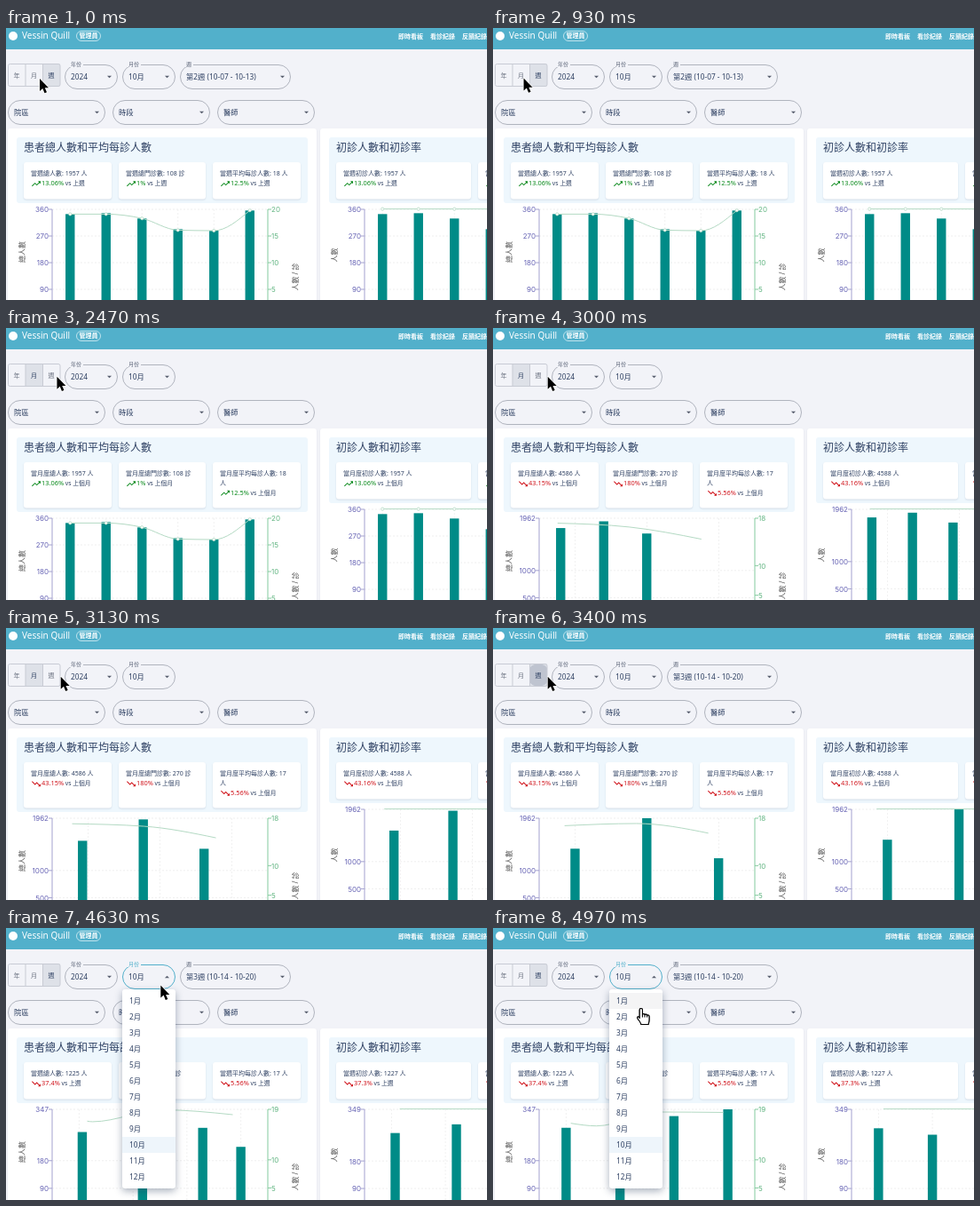
These frames come from a looping animation (542x306 px, 5.01 s). An HTML page with a canvas:

```html
<!DOCTYPE html>
<html lang="zh-Hant">
<head>
<meta charset="utf-8">
<style>
html, body { margin: 0; width: 100%; height: 100%; overflow: hidden; background: #f2f3f8 }
canvas { display: block; width: 542px; height: 306px }
</style>
</head>
<body>
<canvas id="stage"></canvas>
<script>
const LOOP = 5010, BASE = 324, PLOT = 120, PLOT_W = 243;
const MONTH_CLICK = 1650, WEEK_CLICK = 3340, MENU_OPEN = 4330;
const FONT = '"Noto Sans","Noto Sans CJK TC","Noto Sans CJK",sans-serif';
const AXIS_FONT = 'Inter,"Noto Sans",sans-serif';
const BG = '#f2f3f8', NAVY = '#2f4163', TEAL = '#008b87', BLUE = '#52b0cb';

const canvas = document.getElementById('stage'), c = canvas.getContext('2d');
const dpr = window.devicePixelRatio || 1;
canvas.width = 542 * dpr;
canvas.height = 306 * dpr;

const UP = new Path2D('m16 6 2.29 2.29-4.88 4.88-4-4L2 16.59 3.41 18l6-6 4 4 6.3-6.29L22 12V6z');
const ARROW = new Path2D('M0 0V14L3.3 11L5.5 16.3L8 15.3L5.8 10.3H10Z');
const HAND = new Path2D('M-1.8 11V1.5Q-1.8 0-.2 0T1.4 1.5V6.5Q3 5.5 4 7Q5.5 6 6.6 7.6Q9 7 9 9.5V13Q9 15 8 18H0Q-1 15-4 11.5Q-5 9.5-3.5 9.2Q-2.6 9.2-1.8 11Z');
const FINGERS = new Path2D('M1.4 6.5V10M4 7V10M6.6 7.6V10');

// Each data set: when it arrives, card figures, bar values and axis ranges.
const sets = [
  { at: -9999, up: true, people: [1957, 1957], visits: 108, avg: 18,
    pct: ['13.06%', '1%', '12.5%', '13.06%'],
    bars: [[344, 347, 329, 293, 288, 356], [344, 347, 329, 293, 288, 356]],
    max: [360, 360], ticks: [270, 180, 90], line: [19.1, 19.1, 18.3, 16.1, 16, 19.8], lineMax: 20, lineTicks: [15, 10, 5] },
  { at: 2920, people: [4586, 4588], visits: 270, avg: 17,
    pct: ['43.15%', '180%', '5.56%', '43.16%'],
    bars: [[1400, 1962, 1224], [1400, 1962, 1226]],
    max: [1962, 1962], ticks: [1000, 500], line: [16.1, 18, 17], lineMax: 18, lineTicks: [10, 5] },
  { at: 4435, people: [1225, 1227], visits: 72, avg: 17,
    pct: ['37.4%', '25%', '5.56%', '37.3%'],
    bars: [[287, 266, 325, 347], [287, 266, 325, 349]],
    max: [347, 349], ticks: [180, 90], line: [16, 15, 18, 19], lineMax: 19, lineTicks: [10, 5] }
];

// Cursor tip: time, x, y
const path = [[0, 38, 57], [700, 37, 57], [1080, 33, 56], [1300, 32, 55], [2000, 32, 55], [2550, 61.7, 54.7],
  [3700, 61.7, 54.7], [4100, 148.5, 59.5], [4300, 150, 59.5], [4630, 174.3, 64.6], [4780, 174.3, 66], [4960, 167, 90.5], [5010, 167, 90.5]];

const clamp = v => Math.max(0, Math.min(1, v));
const mix = (a, b, k) => a + (b - a) * k;

// CSS "ease" curve
function ease(x) {
  x = clamp(x);
  let lo = 0, hi = 1, s = .5;
  for (let i = 0; i < 20; i++) {
    s = (lo + hi) / 2;
    const px = .75 * s * (1 - s) ** 2 + .75 * s * s * (1 - s) + s ** 3;
    if (px < x) lo = s; else hi = s;
  }
  return .3 * s * (1 - s) ** 2 + 3 * s * s * (1 - s) + s ** 3;
}

function cursorAt(t) {
  const i = path.findIndex((p, n) => n && t <= p[0]), a = path[i - 1], b = path[i];
  const k = (t - a[0]) / (b[0] - a[0]);
  return [mix(a[1], b[1], k), mix(a[2], b[2], k)];
}

function text(s, x, y, size, color = NAVY, align = 'left', weight = 400, font = FONT) {
  c.font = `${weight} ${size}px ${font}`;
  c.fillStyle = color;
  c.textAlign = align;
  c.textBaseline = 'middle';
  c.fillText(s, x, y);
  return c.measureText(s).width;
}

function vertical(s, x, y) {
  c.save();
  c.translate(x, y);
  c.rotate(-Math.PI / 2);
  text(s, 0, 0, 8, '#555', 'center');
  c.restore();
}

function box(x, y, w, h, r, fill, stroke, width = 1) {
  c.beginPath();
  c.roundRect(x, y, w, h, r);
  if (fill) { c.fillStyle = fill; c.fill(); }
  if (stroke) { c.strokeStyle = stroke; c.lineWidth = width; c.stroke(); }
}

function shadowBox(x, y, w, h, r, blur, alpha, dy = 1) {
  c.save();
  c.shadowColor = `rgba(40,60,90,${alpha})`;
  c.shadowBlur = blur * dpr;
  c.shadowOffsetY = dy * dpr;
  box(x, y, w, h, r, '#fff');
  c.restore();
}

function seg(x1, y1, x2, y2, color) {
  c.strokeStyle = color;
  c.lineWidth = 1;
  c.beginPath();
  c.moveTo(x1, y1);
  c.lineTo(x2, y2);
  c.stroke();
}

function header() {
  c.fillStyle = BLUE;
  c.fillRect(0, 0, 542, 24);
  c.fillStyle = '#fff';
  c.beginPath();
  c.arc(8, 9, 5, 0, 7);
  c.fill();
  text('Vessin Quill', 18, 9.5, 10, '#fff', 'left', 500);
  box(79.5, 3.5, 27, 11, 5.5, null, '#d9eff5', .8);
  text('管理員', 93, 9, 7, '#fff', 'center', 700);
  ['即時看板', '看診紀錄', '反饋紀錄'].forEach((s, i) => text(s, 442 + 36 * i, 9.5, 7, '#fff', 'left', 700));
}

function toggle(t, tip, hand) {
  const active = t >= MONTH_CLICK && t < WEEK_CLICK ? 1 : 2;
  const click = active === 1 ? MONTH_CLICK : WEEK_CLICK;
  ['年', '月', '週'].forEach((s, i) => {
    const x = 2.5 + 19.5 * i, on = i === active;
    const hover = hand && tip[1] < 66 && tip[0] >= x && tip[0] < x + 19.5;
    if (on || hover) {
      c.fillStyle = on ? (hover ? '#d0d5e1' : '#dee1e8') : '#e6e8ef';
      c.fillRect(x, 40.5, 19.5, 25);
    }
    const age = (t - click) / 550;
    if (on && age > 0 && age < 1) {
      c.save();
      c.beginPath();
      c.rect(x, 40.5, 19.5, 25);
      c.clip();
      c.fillStyle = `rgba(65,78,108,${.22 * (1 - age)})`;
      c.beginPath();
      c.arc(x + 9.7, 53, 8 + 14 * ease(age * 2), 0, 7);
      c.fill();
      c.restore();
    }
    if (i) seg(x, 40.5, x, 65.5, '#c8cbd4');
    text(s, x + 9.5, 53.5, 7, on ? NAVY : '#6b7280', 'center');
  });
  box(2.5, 40.5, 58.5, 25, 2, null, '#c8cbd4');
}

function select(x, y, w, value, label, tip, open) {
  const hover = tip[0] > x && tip[0] < x + w && tip[1] > y && tip[1] < y + 28;
  box(x + .5, y + .5, w - 1, 27, 13.5, null, open ? BLUE : hover ? '#1f2c4c' : '#b0b4be');
  if (label) {
    c.fillStyle = BG;
    c.fillRect(x + 5, y - 2, 6 * label.length + 4, 5);
    text(label, x + 7, y, 6, open ? BLUE : '#5d6679');
  }
  text(value, x + 7, y + 14.3, 8.3);
  const ax = x + w - 9.5, ay = y + 14, d = open ? -1.3 : 1.3;
  c.fillStyle = '#5a6070';
  c.beginPath();
  c.moveTo(ax - 2.6, ay - d);
  c.lineTo(ax + 2.6, ay - d);
  c.lineTo(ax, ay + d);
  c.fill();
}

function card(x, w, h, lines, pct, up, suffix) {
  shadowBox(x, 151, w, h, 3, 2, .14);
  lines.forEach((s, i) => text(s, x + 8, 164.4 + 10.5 * i, 7));
  const y = 164.8 + 10.5 * lines.length, color = up ? '#0a8a1c' : '#d0141c';
  c.save();
  c.translate(x + 8, y);
  c.scale(.5, up ? .5 : -.5);
  c.translate(0, -12);
  c.fillStyle = color;
  c.fill(UP);
  c.restore();
  const tw = text(pct, x + 20, y, 7.4, color, 'left', 500);
  text(` vs ${suffix}`, x + 20 + tw, y, 6.8);
}

// Smooth curve without overshoot through points sorted by x
function curve(p) {
  const n = p.length, slope = i => (p[i + 1][1] - p[i][1]) / (p[i + 1][0] - p[i][0] || 1);
  const m = p.map((q, i) => {
    if (!i || i === n - 1) return 0;
    const a = slope(i - 1), b = slope(i), h = p[i][0] - p[i - 1][0], g = p[i + 1][0] - p[i][0];
    return (Math.sign(a) + Math.sign(b)) * Math.min(Math.abs(a), Math.abs(b), .5 * Math.abs((a * g + b * h) / (h + g))) || 0;
  });
  m[0] = (3 * slope(0) - m[1]) / 2;
  m[n - 1] = (3 * slope(n - 2) - m[n - 2]) / 2;
  c.beginPath();
  c.moveTo(...p[0]);
  for (let i = 0; i < n - 1; i++) {
    const [x, y] = p[i], [u, v] = p[i + 1], d = (u - x) / 3;
    c.bezierCurveTo(x + d, y + d * m[i], u - d, v - d * m[i + 1], u, v);
  }
  c.strokeStyle = '#b4dac4';
  c.lineWidth = 1;
  c.stroke();
}

function chart(t, side, x0, dy, cur) {
  const set = sets[cur], prev = sets[cur - 1];
  const slot = (s, i) => x0 + PLOT_W * (i + .5) / s.line.length;
  const yOf = (v, max) => BASE - PLOT * v / max;
  c.save();
  c.translate(0, dy);

  const ticks = [set.max[side], ...set.ticks];
  c.setLineDash([2, 2]);
  ticks.forEach(v => seg(x0, yOf(v, set.max[side]), x0 + PLOT_W, yOf(v, set.max[side]), '#efefef'));
  set.line.forEach((v, i) => seg(slot(set, i), 204, slot(set, i), BASE, '#f1f1f1'));
  c.setLineDash([]);

  seg(x0, 204, x0, BASE, '#a3a1cf');
  ticks.forEach(v => {
    const y = yOf(v, set.max[side]);
    seg(x0 - 4, y, x0, y, '#a3a1cf');
    text(v, x0 - 4, y + 1, 8, '#6663b4', 'right', 400, AXIS_FONT);
  });
  if (!side) {
    const x = x0 + PLOT_W;
    seg(x, 204, x, BASE, '#82ca9d');
    [set.lineMax, ...set.lineTicks].forEach(v => {
      const y = yOf(v, set.lineMax);
      seg(x, y, x + 4, y, '#82ca9d');
      text(v, x + 4, y + 1, 8, '#62b582', 'left', 400, AXIS_FONT);
    });
  }

  const age = t - set.at - (side ? 18 : 0), kb = ease(age / 520), kl = ease(age / 1900);
  c.fillStyle = TEAL;
  set.bars[side].forEach((v, i) => {
    let x = slot(set, i), y = yOf(v, set.max[side]);
    const old = prev && prev.bars[side][i];
    if (prev) {
      x = old ? mix(slot(prev, i), x, kb) : x;
      y = mix(old ? yOf(old, prev.max[side]) : BASE, y, kb);
    }
    c.fillRect(x - 5.2, y, 10.4, BASE - y);
  });

  const lineY = (s, i) => side ? 203.6 : yOf(s.line[i], s.lineMax);
  const pts = set.line.map((v, i) => {
    const x = slot(set, i), y = lineY(set, i);
    if (!prev) return [x, y];
    const j = Math.floor(i * prev.line.length / set.line.length);
    return [mix(slot(prev, j), x, kl), mix(lineY(prev, j), y, kl)];
  });
  curve(pts);
  if (kl === 1 || !prev) for (const [x, y] of pts) box(x - 1.6, y - 1.6, 3.2, 3.2, 1.6, '#fff', '#b4dac4', .8);
  c.restore();
}

function panels(t) {
  const cur = t < sets[1].at ? 0 : t < sets[2].at ? 1 : 2, s = sets[cur];
  const month = t >= MONTH_CLICK && t < 3440, dy = month ? 10 : 0;
  const span = month ? '當月度' : '當週', suffix = month ? '上個月' : '上週';

  shadowBox(2, 113, 348, 220, 3, 2, .1);
  shadowBox(354, 113, 348, 220, 3, 2, .1);
  box(12, 123, 328, 74 + dy, 3, '#eef7fd');
  box(364, 123, 328, 74, 3, '#eef7fd');
  text('患者總人數和平均每診人數', 20, 136, 12, NAVY, 'left', 500);
  text('初診人數和初診率', 372, 136, 12, NAVY, 'left', 500);

  const h = 41.5 + dy, avg = `${span}平均每診人數: ${s.avg}`;
  card(20, 99, h, [`${span}總人數: ${s.people[0]} 人`], s.pct[0], s.up, suffix);
  card(127, 98, h, [`${span}總門診數: ${s.visits} 診`], s.pct[1], s.up, suffix);
  card(233, 99, h, month ? [avg, '人'] : [avg + ' 人'], s.pct[2], s.up, suffix);
  card(372, 152, 41.5, [`${span}初診人數: ${s.people[1]} 人`], s.pct[3], s.up, suffix);
  card(532, 152, 41.5, [`${span}初診率`], '0%', s.up, suffix);

  chart(t, 0, 52, dy, cur);
  chart(t, 1, 404, 0, cur);
  vertical('總人數', 19, 252 + dy);
  vertical('人數 / 診', 327, 280 + dy);
  vertical('人數', 371, 255.5);
}

function menu(t, tip, hand) {
  const k = ease((t - MENU_OPEN) / 180);
  if (!k) return;
  c.save();
  c.globalAlpha = k;
  c.translate(0, 69);
  c.scale(1, mix(.6, 1, k));
  c.translate(0, -69);
  shadowBox(131, 69, 60, 224, 3, 8, .4, 3);
  for (let i = 0; i < 12; i++) {
    const y = 73 + 18 * i, hover = hand && tip[1] >= y && tip[1] < y + 18;
    if (i === 9 || hover) {
      c.fillStyle = hover ? '#f4f4f5' : '#eef5fb';
      c.fillRect(131, y, 60, 18);
    }
    text(`${i + 1}月`, 139, y + 9.6, 8.3);
  }
  c.restore();
}

function cursor([x, y], hand) {
  c.save();
  c.translate(x, y);
  c.lineJoin = 'round';
  c.lineWidth = hand ? 1.1 : 1.4;
  c.strokeStyle = hand ? '#000' : '#fff';
  c.fillStyle = hand ? '#fff' : '#000';
  const shape = hand ? HAND : ARROW;
  c.stroke(shape);
  c.fill(shape);
  if (hand) { c.stroke(shape); c.stroke(FINGERS); }
  c.restore();
}

function draw(t) {
  const tip = cursorAt(t), hand = t > 1100 && t < 2400 || t > 4850;
  const open = t >= MENU_OPEN;
  c.setTransform(dpr, 0, 0, dpr, 0, 0);
  c.fillStyle = BG;
  c.fillRect(0, 0, 542, 306);
  header();
  toggle(t, tip, hand);
  select(66, 41, 60, '2024', '年份', tip);
  select(131, 41, 60, '10月', '月份', tip, open);
  if (t < MONTH_CLICK) select(196, 41, 125, '第2週 (10-07 - 10-13)', '週', tip);
  else if (t >= WEEK_CLICK) select(196, 41, 125, '第3週 (10-14 - 10-20)', '週', tip);
  ['院區', '時段', '醫師'].forEach((s, i) => select(2 + 118 * i, 81, 110, s, '', open ? [0, 0] : tip));
  panels(t);
  menu(t, tip, hand);
  cursor(tip, hand);
}

const start = performance.now();
function frame() {
  draw((performance.now() - start) % LOOP);
  requestAnimationFrame(frame);
}
frame();
</script>
</body>
</html>
```
